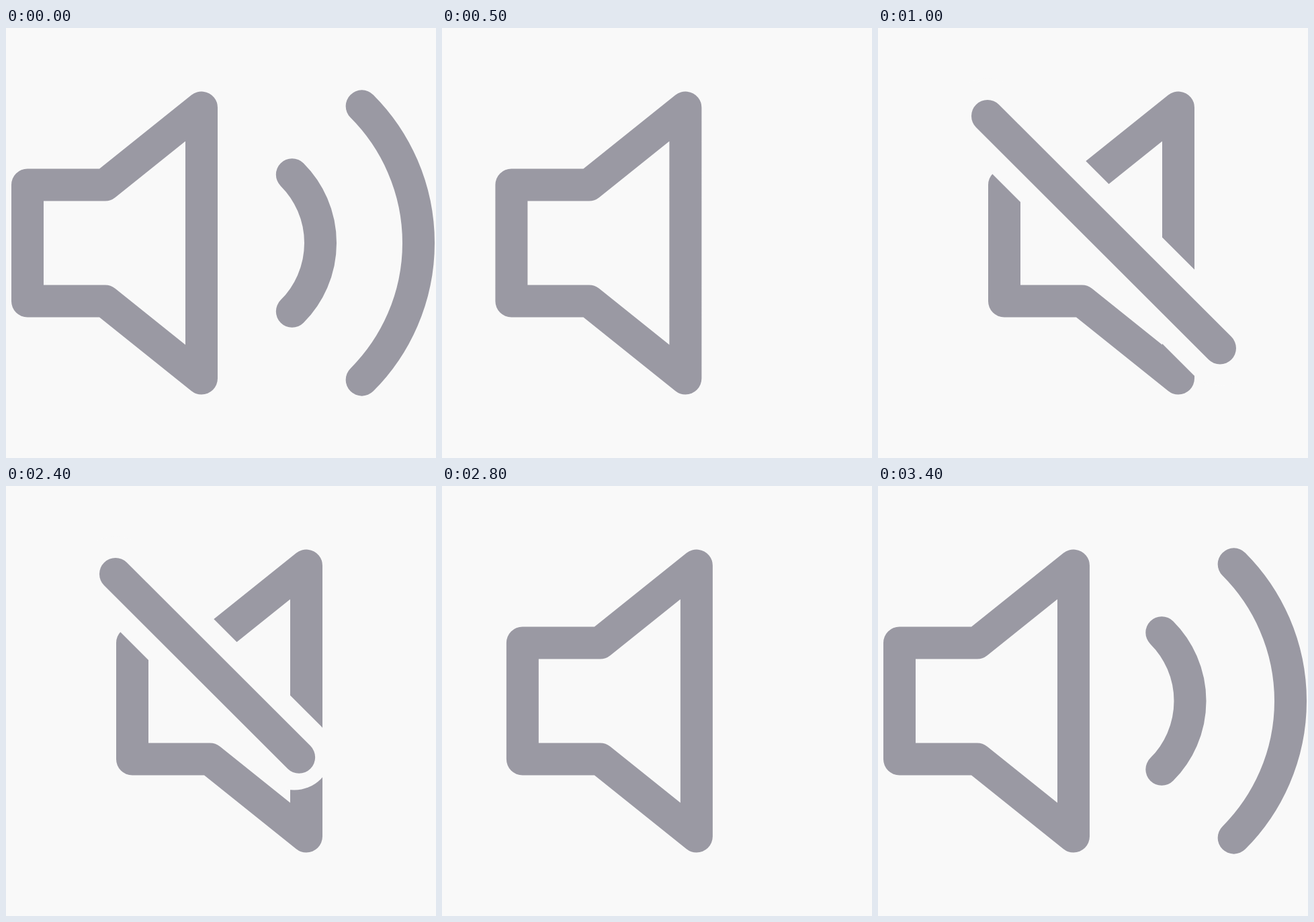
An HTML page with a canvas that plays this animation: 640 by 640 pixels, repeating every 3600 ms.

```html
<!DOCTYPE html>
<html lang="en">
<head>
<meta charset="utf-8">
<title>Mute toggle</title>
<style>
  html, body { margin: 0; width: 100%; height: 100%; overflow: hidden; background: #f9f9f9; }
  canvas { display: block; width: 100vw; height: 100vh; }
</style>
</head>
<body>
<canvas id="stage" width="640" height="640"></canvas>
<script>
const ctx = document.getElementById('stage').getContext('2d');
const LOOP = 3600, STEP = 100, REOPEN = 3000;
const INK = '#9a99a3', PAPER = '#f9f9f9';
const SIZE = 640, MID = SIZE / 2, LINE = 48, BAR = 291;

// Progress from 0 to 1 between two times.
const ramp = (t, from, to) => Math.min(1, Math.max(0, (t - from) / (to - from)));
const mix = (a, b, k) => a + (b - a) * k;

function stroke(color, width) {
  ctx.strokeStyle = color;
  ctx.lineWidth = width;
  ctx.stroke();
}

function wave(x, radius, width) {
  ctx.beginPath();
  ctx.arc(x, MID, radius, -Math.PI / 4, Math.PI / 4);
  stroke(INK, width);
}

// The near wave slides out from behind the bar, the far one grows from the left edge.
function waves(open, nearX) {
  if (open <= 0) return;
  ctx.save();
  ctx.beginPath();
  ctx.rect(BAR, 0, SIZE - BAR, SIZE);
  ctx.clip();
  const scale = mix(0.537, 1, open);
  wave(mix(144, nearX, open), 144, LINE);
  wave(326 * scale, 288 * scale, LINE * scale);
  ctx.restore();
}

function speaker(x) {
  const half = [[32, 86.5], [147.5, 86.5], [BAR, 201.5]];
  ctx.beginPath();
  for (const [px, dy] of half) ctx.lineTo(x + px, MID - dy);
  for (const [px, dy] of half.reverse()) ctx.lineTo(x + px, MID + dy);
  ctx.closePath();
  stroke(INK, LINE);
}

function slashLine(part, color, width) {
  ctx.beginPath();
  ctx.moveTo(163, 131);
  ctx.lineTo(163 + 346 * part, 131 + 345.6 * part);
  stroke(color, width);
}

function slash(part) {
  if (part <= 0) return;
  // The gap's end trails slightly behind the slash.
  slashLine(Math.max(0, part - (1 - part) * 0.1), PAPER, 112);
  slashLine(part, INK, LINE);
}

function draw(t) {
  ctx.fillStyle = PAPER;
  ctx.fillRect(0, 0, SIZE, SIZE);
  ctx.lineCap = ctx.lineJoin = 'round';

  const closing = t < REOPEN;
  if (closing) waves(1 - ramp(t, 0, 400), 324);
  else waves(ramp(t, REOPEN, 3400) || 0.001, 320.5);

  // The slide back is cut short when the waves reopen.
  speaker(closing ? 156 * (ramp(t, 365, 660) - ramp(t, 2610, 3045)) : 0);
  slash(ramp(t, 600, 1000) - ramp(t, 2320, 2700));
}

const start = performance.now();
function tick() {
  const t = (performance.now() - start) % LOOP;
  draw(Math.floor(t / STEP) * STEP);
  requestAnimationFrame(tick);
}
tick();
</script>
</body>
</html>
```
